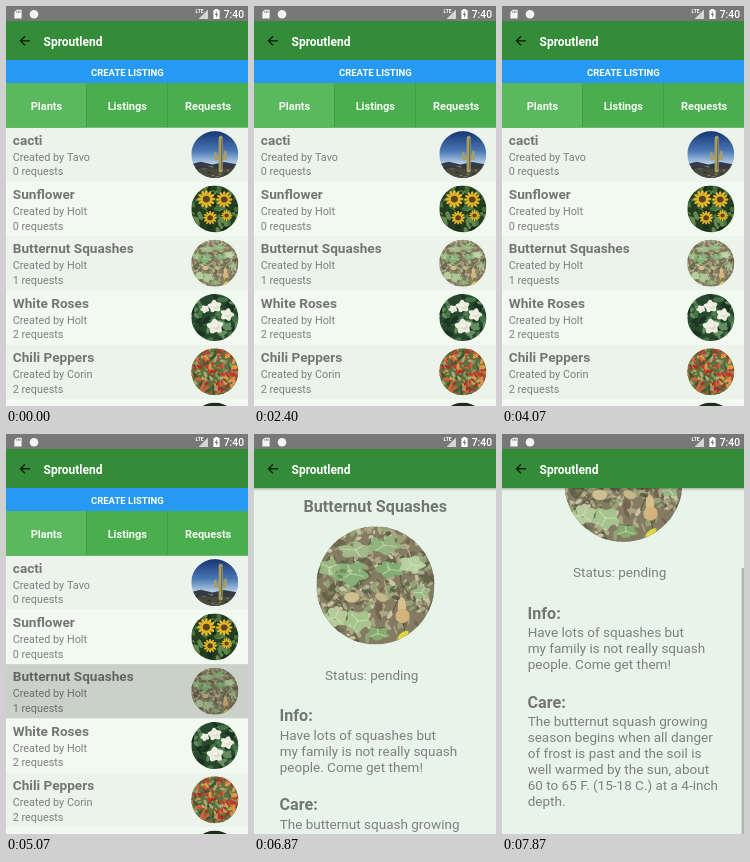
Animation, 242 px wide and 400 px high, one loop 8 s. Source, as an HTML page with a canvas:

```html
<!DOCTYPE html>
<html lang="en">
<head>
<meta charset="utf-8">
<title>Plant swap app</title>
<style>
  html, body { margin: 0; width: 100%; height: 100%; overflow: hidden; background: #e8f4ea; }
  canvas { display: block; width: 242px; height: 400px; }
</style>
</head>
<body>
<canvas id="stage"></canvas>
<script>
const W = 242, H = 400, LOOP = 8000;
const TOP = 54, TABS = 77, ROWS = 121.6, ROW_H = 54.3;
const PRESS = 4930, OPEN = 5090, OPENED = 5200;
const BAR_FADE = 5870, BAR_GONE = 6200;
const SCROLL = 7200, SCROLLED = 7760, MAX_SCROLL = 102.5;
const GREY = '#7d807d', DARK_GREY = '#737673';

const canvas = document.getElementById('stage');
const ratio = Math.max(1, window.devicePixelRatio || 1);
canvas.width = W * ratio;
canvas.height = H * ratio;
const ctx = canvas.getContext('2d');

const clamp = v => Math.min(1, Math.max(0, v));
const progress = (t, from, to) => clamp((t - from) / (to - from));
const easeInOut = p => p * p * (3 - 2 * p);

function rect(x, y, w, h, color) {
  ctx.fillStyle = color;
  ctx.fillRect(x, y, w, h);
}

function oval(x, y, rx, ry, color, angle = 0) {
  ctx.fillStyle = color;
  ctx.beginPath();
  ctx.ellipse(x, y, rx, ry, angle, 0, Math.PI * 2);
  ctx.fill();
}

function shape(points, color) {
  ctx.fillStyle = color;
  ctx.beginPath();
  points.forEach(([x, y]) => ctx.lineTo(x, y));
  ctx.closePath();
  ctx.fill();
}

function line(points, width, color) {
  ctx.strokeStyle = color;
  ctx.lineWidth = width;
  ctx.beginPath();
  points.forEach(([x, y]) => ctx.lineTo(x, y));
  ctx.stroke();
}

function text(str, x, y, size, color, weight = 400, align = 'left') {
  ctx.font = `${weight} ${size}px Roboto, sans-serif`;
  ctx.textAlign = align;
  ctx.fillStyle = color;
  ctx.fillText(str, x, y);
}

function random(seed) {
  return () => (seed = (seed * 16807) % 2147483647) / 2147483647;
}

function speckle(colors, count, size, seed) {
  const rnd = random(seed);
  for (let i = 0; i < count; i++) {
    const x = rnd() * 2 - 1, y = rnd() * 2 - 1, r = size * (0.5 + rnd());
    oval(x, y, r, r * 0.5, colors[i % colors.length], rnd() * 3);
  }
}

// A lobed leaf with light veins.
function leaf(x, y, rx, ry, color, turn) {
  const edge = [];
  for (let a = 0; a < Math.PI * 2; a += 0.2) {
    const r = 0.85 + 0.15 * Math.cos(5 * a + turn);
    edge.push([x + Math.cos(a + turn) * rx * r, y + Math.sin(a + turn) * ry * r]);
  }
  shape(edge, color);
  for (let i = 0; i < 3; i++) {
    const a = turn + i * 2.1;
    line([[x, y], [x + Math.cos(a) * rx * 0.7, y + Math.sin(a) * ry * 0.7]], 0.02, 'rgba(225,238,200,.5)');
  }
}

// Pictures are painted in a -1..1 square and clipped to a circle.
function picture(paint, x, y, r) {
  ctx.save();
  ctx.translate(x, y);
  ctx.scale(r, r);
  ctx.beginPath();
  ctx.arc(0, 0, 1, 0, Math.PI * 2);
  ctx.clip();
  ctx.lineCap = ctx.lineJoin = 'round';
  paint();
  ctx.restore();
}

function cactus() {
  const sky = ctx.createLinearGradient(0, -1, 0, 0.4);
  sky.addColorStop(0, '#163673');
  sky.addColorStop(0.6, '#4977b4');
  sky.addColorStop(1, '#b9cfe4');
  rect(-1, -1, 2, 2, sky);
  shape([[-1, 0.4], [-0.6, 0.3], [-0.1, 0.42], [0.4, 0.32], [1, 0.42], [1, 1], [-1, 1]], '#343b45');
  rect(-1, 0.6, 2, 0.4, '#494a3c');
  ctx.save();
  ctx.translate(0, 0.72);
  ctx.scale(1, 0.28);
  speckle(['#817a60', '#252e2b'], 30, 0.11, 17);
  ctx.restore();
  const skin = '#a99d62';
  line([[0.25, 0.68], [0.25, -0.72]], 0.17, skin);
  line([[0.02, -0.08], [0.04, 0.16], [0.44, 0.16], [0.46, -0.12]], 0.11, skin);
  line([[0.29, 0.6], [0.29, -0.65]], 0.05, '#766f45');
}

function sunflower() {
  rect(-1, -1, 2, 2, '#253d20');
  speckle(['#47703a', '#172f1b', '#638a4e'], 80, 0.14, 23);
  const heads = [[-0.36, -0.42, 0.36], [0.4, -0.4, 0.33], [-0.2, 0.38, 0.28], [0.5, 0.28, 0.22]];
  for (const [x, y, r] of heads) {
    for (let a = 0; a < 6.2; a += Math.PI / 6) {
      oval(x + Math.cos(a) * r * 0.65, y + Math.sin(a) * r * 0.65, r * 0.42, r * 0.17, '#e5b728', a);
    }
    oval(x, y, r * 0.42, r * 0.4, '#5e431d');
  }
}

function squash() {
  rect(-1, -1, 2, 2, '#857b62');
  speckle(['#5f634a', '#aca584', '#74654f', '#94a375', '#c8c5a5'], 360, 0.065, 41);
  const rnd = random(77);
  for (let i = 0; i < 40; i++) {
    const x = rnd() * 2 - 1, y = rnd() * 2 - 1;
    line([[x, y], [x + rnd() * 0.3 - 0.15, y + 0.35 * rnd()]], 0.018, i % 2 ? '#b9b38f' : '#565942');
  }
  const leaves = [
    [-0.42, -0.2, 0.32, 0.22, '#86b077', 0.3], [-0.34, -0.6, 0.32, 0.15, '#a2b98b', 1.2],
    [0.15, -0.68, 0.3, 0.17, '#93b47f', 0.2], [0.25, -0.27, 0.26, 0.15, '#82ad72', 2.3],
    [0.62, -0.35, 0.24, 0.16, '#b6d0a1', 0.1], [-0.78, -0.3, 0.2, 0.16, '#98b782', 1.6],
    [-0.68, 0.55, 0.25, 0.18, '#b3cc9a', 0.8], [-0.3, 0.6, 0.25, 0.2, '#a6c58e', 2],
    [0.04, 0.82, 0.22, 0.12, '#87aa71', 0.5], [0.78, 0.12, 0.17, 0.13, '#9bb787', 1]
  ];
  leaves.forEach(args => leaf(...args));
  speckle(['rgba(92,111,70,.5)', 'rgba(214,224,184,.5)'], 90, 0.045, 97);
  oval(-0.4, 0.2, 0.13, 0.09, '#cebf91');
  oval(0.1, 0.2, 0.11, 0.07, '#c6b688', 0.4);
  oval(0.45, 0.36, 0.07, 0.16, '#d8bf8b');
  oval(0.46, 0.52, 0.12, 0.12, '#d4b47a');
  oval(0.47, 0.84, 0.11, 0.045, '#e1d540', -0.6);
}

function roses() {
  rect(-1, -1, 2, 2, '#28482e');
  speckle(['#447446', '#1b3321', '#648e62'], 80, 0.14, 31);
  const blooms = [[0, -0.48, 0.28], [0.52, -0.12, 0.28], [0.02, 0.38, 0.34], [-0.42, -0.36, 0.18]];
  for (const [x, y, r] of blooms) {
    leaf(x, y, r * 1.1, r, '#eeefe2', x + 1);
    oval(x + r * 0.1, y, r * 0.45, r * 0.35, '#dadcc7', 0.5);
    oval(x, y - r * 0.12, r * 0.3, r * 0.22, '#f8f8ef');
  }
}

function peppers() {
  rect(-1, -1, 2, 2, '#5f6f3f');
  speckle(['#849359', '#3d5430', '#aaa873'], 130, 0.1, 53);
  speckle(['#c43d2f', '#d55e39', '#a33127', '#dd9747'], 120, 0.1, 71);
}

function shade() {
  rect(-1, -1, 2, 2, '#1c2b1c');
}

const plants = [
  ['cacti', 'Tavo', 0, cactus],
  ['Sunflower', 'Holt', 0, sunflower],
  ['Butternut Squashes', 'Holt', 1, squash],
  ['White Roses', 'Holt', 2, roses],
  ['Chili Peppers', 'Corin', 2, peppers],
  ['', '', 0, shade]
];

function drawRow([name, owner, requests, paint], i, pressed) {
  const y = ROWS + i * ROW_H;
  rect(0, y, W, ROW_H + 0.2, i % 2 ? '#f2f9f1' : '#ebf3ea');
  picture(paint, 208.8, y + 27, 23.5);
  if (name) {
    text(name, 6.8, y + 17.2, 13.6, DARK_GREY, 700);
    text('Created by ' + owner, 6.7, y + 33.1, 10.85, GREY);
    text(requests + ' requests', 6.7, y + 47.7, 10.85, GREY);
  }
  if (pressed) rect(0, y, W, ROW_H, 'rgba(0,0,0,.14)');
}

function drawList(t) {
  plants.forEach((plant, i) => drawRow(plant, i, i === 2 && t >= PRESS));
  rect(0, TOP, W, TABS - TOP, '#2699f2');
  text('CREATE LISTING', 121.3, 69.6, 9.5, '#fff', 700, 'center');
  rect(0, TABS, W, ROWS - TABS, '#4aad4e');
  rect(0, TABS, 80, ROWS - TABS, '#5ab85e');
  ['Plants', 'Listings', 'Requests'].forEach((label, i) => {
    text(label, 40.5 + i * 80.8, 104, 11, '#f4faf3', 700, 'center');
  });
  ctx.setLineDash([1.5, 1]);
  for (const x of [80.5, 161.5]) line([[x, TABS], [x, ROWS]], 0.8, '#3d8f41');
  ctx.setLineDash([]);
}

const info = ['Have lots of squashes but', 'my family is not really squash', 'people. Come get them!'];
const care = [
  'The butternut squash growing', 'season begins when all danger', 'of frost is past and the soil is',
  'well warmed by the sun, about', '60 to 65 F. (15-18 C.) at a 4-inch', 'depth.'
];

function section(title, lines, y) {
  text(title, 25.5, y, 16.15, DARK_GREY, 700);
  lines.forEach((str, i) => text(str, 25.7, y + 18.3 + i * 16, 13.52, GREY));
}

function drawDetail(t) {
  const scroll = MAX_SCROLL * easeInOut(progress(t, SCROLL, SCROLLED));
  rect(0, TOP, W, H - TOP, '#e8f4ea');
  ctx.save();
  ctx.translate(0, -scroll);
  text('Butternut Squashes', 121.2, 78, 16.15, DARK_GREY, 700, 'center');
  picture(squash, 121.4, 151.4, 59);
  text('Status: pending', 117.7, 245.6, 13.52, GREY, 400, 'center');
  section('Info:', info, 287.4);
  section('Care:', care, 376.4);
  ctx.restore();
  const bar = t >= SCROLL ? 1 : 1 - progress(t, BAR_FADE, BAR_GONE);
  rect(239.6, TOP + 80 * scroll / MAX_SCROLL, 2.4, 266, `rgba(0,0,0,${0.25 * bar})`);
  const shadow = ctx.createLinearGradient(0, TOP, 0, TOP + 3);
  shadow.addColorStop(0, 'rgba(0,0,0,.25)');
  shadow.addColorStop(1, 'rgba(0,0,0,0)');
  rect(0, TOP, W, 3, shadow);
}

function drawHeader() {
  rect(0, 0, W, 15, '#777877');
  rect(0, 15, W, TOP - 15, '#348b38');

  shape([[10.5, 3.8], [15.6, 3.8], [15.6, 12.6], [8.4, 12.6], [8.4, 6]], '#f4f4f4');
  for (const x of [10.4, 12, 13.6]) rect(x, 4.8, 0.8, 2, '#777877');
  oval(28, 8.2, 4.3, 4.3, '#f4f4f4');

  text('LTE', 189.5, 7, 5, '#fff', 700);
  shape([[202, 3.5], [202, 13], [192.5, 13]], '#d5d5d5');
  rect(209, 3, 3, 1.4, '#fff');
  rect(207.4, 4, 6.2, 9, '#fff');
  shape([[211, 5], [208.8, 9], [210.2, 9], [210, 12], [212.2, 8], [210.8, 8]], '#777877');
  text('7:40', 238, 12.2, 10.3, '#fff', 500, 'right');

  ctx.lineCap = 'butt';
  ctx.lineJoin = 'miter';
  line([[24, 34.8], [15, 34.8]], 1.4, '#10200f');
  line([[19, 30.3], [14.5, 34.8], [19, 39.3]], 1.4, '#10200f');
  text('Sproutlend', 37.5, 39.6, 12, '#fff', 700);
}

function draw(t) {
  ctx.setTransform(ratio, 0, 0, ratio, 0, 0);
  const open = progress(t, OPEN, OPENED);
  if (open < 1) drawList(t);
  if (open > 0) {
    const e = 1 - (1 - open) ** 2;
    ctx.save();
    ctx.globalAlpha = e;
    ctx.translate(0, 40 * (1 - e));
    drawDetail(t);
    ctx.restore();
  }
  drawHeader();
}

const start = performance.now();
function tick() {
  draw((performance.now() - start) % LOOP);
  requestAnimationFrame(tick);
}
tick();
</script>
</body>
</html>
```
